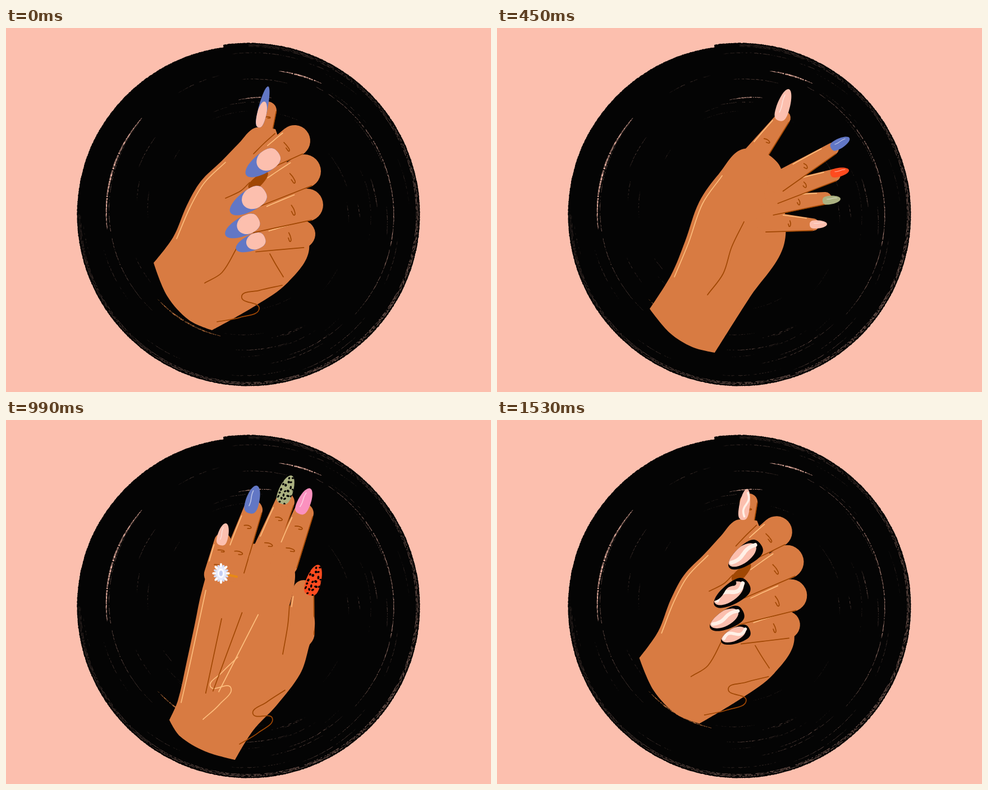
These frames come from a looping animation (864x648 px, 1.62 s). An HTML page with a canvas:

```html
<!DOCTYPE html>
<html lang="en">
<head>
<meta charset="utf-8">
<title>Nail art hand</title>
<style>
  html, body { margin: 0; width: 100%; height: 100%; overflow: hidden; background: #fcbfae; }
  canvas { display: block; width: 864px; height: 648px; }
</style>
</head>
<body>
<canvas id="stage" width="864" height="648"></canvas>
<script>
const W = 864, H = 648, STEP = 90, TURN = 9, TAU = Math.PI * 2;
const ROSE = '#fcbfae', INK = '#040404', SKIN = '#d87b42', LINE = '#a04703', LIGHT = '#fdbd7c';
const BLUE = '#6277c5', OLIVE = '#abb181', CREAM = '#fff0e6', ORANGE = '#ee7329', RED = '#ff4b1f', PINK = '#fb91bf';

const ctx = document.getElementById('stage').getContext('2d');
const lerp = (a, b, t) => a + (b - a) * t;

function seeded(seed) {
  return () => (seed = (seed * 16807) % 2147483647) / 2147483647;
}

const parse = text => text.split(' ').map(s => {
  const [x, y] = s.split(',').map(parseFloat);
  return { x, y, corner: s.endsWith('*') };
});

// Smooth curve through points; corner points stay sharp.
function curve(p, closed) {
  const n = p.length, path = new Path2D();
  const at = i => closed ? p[(i + n) % n] : p[Math.max(0, Math.min(n - 1, i))];
  const slope = i => {
    const a = at(i - 1), b = at(i + 1), d = Math.hypot(b.x - a.x, b.y - a.y) || 1;
    return at(i).corner ? [0, 0] : [(b.x - a.x) / d, (b.y - a.y) / d];
  };
  path.moveTo(p[0].x, p[0].y);
  for (let i = 0; i < (closed ? n : n - 1); i++) {
    const a = at(i), b = at(i + 1), k = Math.hypot(b.x - a.x, b.y - a.y) / 3;
    const [ax, ay] = slope(i), [bx, by] = slope(i + 1);
    path.bezierCurveTo(a.x + ax * k, a.y + ay * k, b.x - bx * k, b.y - by * k, b.x, b.y);
  }
  return path;
}

function stroke(color, points, width = 1.7) {
  ctx.strokeStyle = color;
  ctx.lineWidth = width;
  ctx.stroke(curve(points));
}

function blob(color, x, y, rx, ry, turn = 0) {
  ctx.fillStyle = color;
  ctx.beginPath();
  ctx.ellipse(x, y, rx, ry, turn, 0, TAU);
  ctx.fill();
}

function wave(color, x0, x1, y, width, swing = .35) {
  const points = [];
  for (let u = 0; u <= 1; u += .125) points.push({ x: lerp(x0, x1, u), y: y + swing * Math.sin(u * TAU) });
  stroke(color, points, width);
}

function spots(size, x0, x1, y0, y1) {
  const rnd = seeded(71), gap = size * 2.7;
  for (let x = x0; x < x1; x += gap) for (let y = y0; y < y1; y += gap) {
    blob(INK, x + rnd() * gap * .6, y + rnd() * gap * .6, size * (.6 + rnd() * .5), size * (.5 + rnd() * .3), rnd() * 3);
  }
}

// Nail paints work in nail space: x runs from root 0 to tip L, y from -1 to 1.
const paints = {
  plain: color => L => {
    blob(color, L / 2, 0, L, 2);
    wave('rgba(255,255,255,.6)', L * .25, L * .8, -.3, .12, .05);
  },
  leopard: color => L => {
    blob(color, L / 2, 0, L, 2);
    spots(.22, 0, L, -1, 1);
  },
  french: L => {
    blob(BLUE, L / 2, 0, L, 2);
    blob(ROSE, L * .3, 0, L * .33, 1.02);
  },
  swirl: (L, i) => {
    blob(i < 4 ? INK : ROSE, L / 2, 0, L, 2);
    blob(ROSE, L * .54, .22, L * .42, .8);
    wave(CREAM, L * .12, L * .88, .25, .38, i % 2 ? .15 : -.35);
    if (i === 2) wave(INK, L * .3, L, .75, .5, .2);
  },
  marble: L => {
    blob(CREAM, L / 2, 0, L, 2);
    blob(ROSE, L * .2, 0, L * .35, 1.1);
    [ORANGE, BLUE, RED, BLUE].forEach((c, k) => wave(c, L * .5, L, k * .5 - .75, k % 2 ? .17 : .26, .3));
  },
  abstract: (L, i) => {
    const side = i === 3 ? -1 : 1;
    blob(ROSE, L / 2, 0, L, 2);
    blob(OLIVE, L * (i === 1 ? .08 : .85), side * .45, L * .24, .65);
    blob(BLUE, L * (i === 1 ? .5 : .25), side * .5, L * .25, .5);
    wave(CREAM, L * .4, L * .9, side * .1, .2);
    spots(.085, L * .12, L * .55, side > 0 ? -.8 : .1, side > 0 ? -.1 : .8);
  }
};

function almond(x0, y0, x1, y1, half, paint) {
  const L = Math.hypot(x1 - x0, y1 - y0) / half;
  ctx.save();
  ctx.translate(x0, y0);
  ctx.rotate(Math.atan2(y1 - y0, x1 - x0));
  ctx.scale(half, half);
  ctx.beginPath();
  ctx.moveTo(0, 0);
  for (const s of [-1, 1]) {
    const [a, b] = s < 0 ? [0, L] : [L, 0];
    if (s < 0) {
      ctx.bezierCurveTo(a, -.75, L * .1, -1, L * .35, -1);
      ctx.bezierCurveTo(L * .7, -1, b, -.55, b, 0);
    } else {
      ctx.bezierCurveTo(a, .55, L * .7, 1, L * .35, 1);
      ctx.bezierCurveTo(L * .1, 1, b, .75, b, 0);
    }
  }
  ctx.clip();
  paint(L);
  ctx.restore();
}

// A tapered finger with a dark edge, a highlight on the other side, and knuckle creases.
function finger([x0, y0, x1, y1, r1], taper, creases) {
  const r0 = r1 * taper, a = Math.atan2(y1 - y0, x1 - x0), d = Math.hypot(x1 - x0, y1 - y0);
  const b = Math.acos((r0 - r1) / d);
  const at = (t, side) => {
    const r = lerp(r0, r1, t) * side;
    return { x: lerp(x0, x1, t) - Math.sin(a) * r, y: lerp(y0, y1, t) + Math.cos(a) * r };
  };
  ctx.fillStyle = SKIN;
  ctx.beginPath();
  ctx.arc(x1, y1, r1, a - b, a + b);
  ctx.arc(x0, y0, r0, a + b, a - b + TAU);
  ctx.fill();
  stroke(LINE, [at(0, .97), at(.5, .97), at(1, .97)]);
  stroke(LIGHT, [at(.35, -.85), at(.6, -.87), at(.85, -.87)]);
  for (const t of creases) stroke(LINE, [at(t, -.3), at(t + .02, .05), at(t, .4), at(t - .03, .1)]);
}

function squiggle(color, [x0, y0, x1, y1]) {
  const dx = x1 - x0, dy = y1 - y0;
  const along = [0, .3, .55, .42, .7, 1], aside = [0, .09, .13, -.12, -.1, 0];
  stroke(color, along.map((t, i) => ({ x: x0 + dx * t - dy * aside[i], y: y0 + dy * t + dx * aside[i] })));
}

function jewel([x, y, rx, bandX, bandY]) {
  const ry = rx * 1.25;
  stroke('#e88913', [{ x, y }, { x: bandX, y: bandY }], 4);
  for (let i = 0; i < 16; i++) {
    const a = i * TAU / 16, r = i % 2 ? .62 : .74;
    blob(i % 2 ? '#d5dbf6' : '#fbfbff', x + rx * r * Math.cos(a), y + ry * r * Math.sin(a), rx * .3, rx * .15, a);
  }
  ['#e6eafb', '#fbfbff', '#c3cdf3'].forEach((c, i) => blob(c, x, y, rx * (.6 - i * .2), ry * (.62 - i * .18)));
}

// Fingers run from little finger to thumb: base, end, end radius, nail root, nail tip.
const fist = {
  palm: '263,418* 298,372 322,316 347,273 385,236 415,205 443,178 480,180* 520,300 540,394 502,453 445,494 367,538* 326,520 287,477',
  fingers: [[442, 383, 526, 367, 25, 461, 373, 410, 394], [435, 347, 536, 315, 29, 450, 340, 391, 369], [445, 300, 531, 255, 30, 461, 290, 400, 329],
    [455, 238, 514, 201, 28, 485, 222, 428, 262], [462, 195, 466, 147, 16, 450, 177, 467, 104]],
  taper: .65, creases: [.75], nailWidth: .26, thumbNail: .11,
  lines: ['479,188 460,205 441,224', '412,390 385,435 354,454', '470,402 480,420 494,443', '434,275 418,290 391,303'],
  squiggles: [[492, 458, 376, 523]],
  gaps: [[434, 287, 466, 257, 9]],
  paints: Array(5).fill(paints.french)
};

const palmSide = {
  palm: '260,458* 298,419 325,375 345,330 362,290 384,260 440,217 462,206 490,196 505,203 522,300 515,360 482,402 440,472 412,512 366,549* 333,537 297,506',
  fingers: [[480, 385, 506, 370, 22, 496, 384, 457, 399], [488, 340, 509, 331, 21, 504, 350, 464, 377], [488, 302, 521, 276, 23, 522, 295, 502, 330],
    [495, 262, 511, 224, 18, 519, 239, 518, 286], [450, 250, 488, 200, 17, 482, 208, 502, 156]],
  taper: .75, creases: [], nailWidth: .25, thumbNail: .24,
  lines: ['505,200 461,285 449,335 440,390 398,475', '470,412 440,467 412,500 368,536', '429,427 431,440 427,450', '453,227 463,229 471,239'],
  squiggles: [[440, 322, 394, 441]],
  shine: [[313, 432, 324, 494]],
  gaps: [[470, 264, 495, 233, 8], [459, 302, 502, 284, 7], [464, 334, 498, 329, 4]],
  paints: Array(5).fill(paints.marble)
};

const sideways = {
  palm: '272,500* 310,440 335,380 360,310 395,260 440,215 500,240 510,300 510,390 450,480 388,578* 348,568 308,543',
  fingers: [[480, 345, 563, 350, 11, 557, 350, 588, 349], [490, 315, 585, 303, 11, 580, 308, 612, 304], [495, 295, 601, 262, 11, 594, 260, 627, 253],
    [500, 275, 598, 215, 11, 595, 214, 628, 196], [450, 240, 510, 160, 13, 502, 165, 520, 109]],
  taper: 1.7, creases: [.5], nailWidth: .24, thumbNail: .2,
  lines: ['440,345 418,390 403,437 375,475'],
  paints: [ROSE, OLIVE, RED, BLUE, ROSE].map(paints.plain)
};

const back = {
  palm: '291,534* 306,500 322,430 336,365 350,300 372,240 400,225 450,220* 500,215 515,275 505,330* 520,340 549,352 538,410 524,452 482,508 440,553 408,605* 355,590 310,563',
  fingers: [[373, 275, 386, 216, 15, 382, 223, 392, 184], [403, 265, 440, 160, 17, 433, 166, 447, 117], [455, 250, 497, 146, 17, 490, 149, 509, 99],
    [496, 255, 530, 166, 18, 522, 167, 542, 122], [524, 380, 530, 304, 19, 540, 312, 557, 258]],
  taper: 1.35, creases: [.28, .72], nailWidth: .24, thumbNail: .24,
  lines: ['505,330 502,365 493,417'],
  squiggles: [[497, 481, 416, 577]],
  shine: [[413, 422, 351, 533]],
  wrist: [340, 560],
  jewel: [383, 273, 15, 411, 279],
  paints: [paints.plain(ROSE), paints.plain(BLUE), paints.leopard(OLIVE), paints.plain(PINK), paints.leopard(RED)]
};

const openBack = {
  ...back,
  palm: '287,533* 297,490 300,420 303,360 310,325 345,318 400,270 440,308* 470,290 493,330 492,381* 520,370 549,362 535,422 522,460 488,522 443,566 410,606* 358,593 313,568',
  fingers: [[323, 325, 314, 219, 15, 309, 234, 307, 185], [375, 290, 385, 149, 17, 381, 167, 384, 110], [417, 300, 448, 112, 19, 445, 130, 448, 62],
    [467, 310, 497, 138, 18, 493, 158, 491, 94], [518, 390, 531, 309, 18, 536, 329, 563, 267]],
  lines: ['493,382 492,420 487,447'],
  squiggles: [[482, 512, 419, 576]],
  shine: [[337, 391, 316, 464]],
  wrist: [330, 560],
  jewel: [357, 297, 19, 389, 297],
  paints: Array(5).fill(paints.abstract)
};

function mix(a, b, t) {
  if (typeof a === 'number') return lerp(a, b, t);
  if (typeof a === 'function') return a;
  if (Array.isArray(a)) return a.map((v, i) => mix(v, b[i], t));
  if (typeof a === 'object') return Object.fromEntries(Object.keys(a).map(k => [k, mix(a[k], b[k], t)]));
  const other = b.match(/[\d.]+/g);
  return a.replace(/[\d.]+/g, v => lerp(+v, +other.shift(), t).toFixed(1));
}

const moved = (hand, dx, dy, turn, scale = 1) => ({ ...hand, move: { dx, dy, turn, scale } });

const shortThumb = fist.fingers.map((f, i) => i < 4 ? f : [...f.slice(0, 5), 454, 178, 464, 123]);
const swirlFist = { ...fist, fingers: shortThumb, thumbNail: .17, paints: Array(5).fill(paints.swirl) };

const poses = [fist, moved(swirlFist, -7, 4, -.03), moved(palmSide, -3, -8, -.04), palmSide, moved(sideways, -6, -14, -.04, .94),
  sideways, mix(back, openBack, -.22), back, mix(back, openBack, .5), openBack];

function drawHand(hand) {
  const { palm, fingers, taper, creases, lines, squiggles = [], shine = [], gaps = [], wrist, move } = hand;
  const outline = parse(palm);
  ctx.save();
  ctx.lineCap = ctx.lineJoin = 'round';
  if (move) {
    ctx.translate(315 + move.dx, 503 + move.dy);
    ctx.rotate(move.turn);
    ctx.scale(move.scale, move.scale);
    ctx.translate(-315, -503);
  }
  finger(fingers[4], taper, creases.slice(0, 1));
  ctx.fillStyle = SKIN;
  ctx.fill(curve(outline, true));
  fingers.slice(0, 4).forEach(f => finger(f, taper, creases));
  gaps.forEach(g => almond(...g, L => blob(LINE, L / 2, 0, L, 2)));
  lines.forEach(s => stroke(LINE, parse(s)));
  squiggles.forEach(s => squiggle(LINE, s));
  shine.forEach(s => squiggle(LIGHT, s));
  stroke(LIGHT, outline.slice(1, 5).map(p => ({ x: p.x + 6, y: p.y + 3 })));
  if (wrist) [LINE, LINE, LIGHT].forEach((color, i) => {
    const [x, y] = fingers[i + 1];
    stroke(color, [.3, .75].map(t => ({ x: lerp(x, wrist[0], t), y: lerp(y, wrist[1], t) })));
  });
  fingers.forEach((f, i) => {
    const [x0, y0, x1, y1] = f.slice(5);
    const half = Math.hypot(x1 - x0, y1 - y0) * (i < 4 ? hand.nailWidth : hand.thumbNail);
    almond(x0, y0, x1, y1, half, L => hand.paints[i](L, i));
  });
  if (hand.jewel) jewel(hand.jewel);
  ctx.restore();
}

// Dry-brush disc, painted once.
function paintDisc() {
  const sheet = document.createElement('canvas'), c = sheet.getContext('2d'), rnd = seeded(19);
  const CX = 432, CY = 332, deg = Math.PI / 180;
  sheet.width = W;
  sheet.height = H;
  c.fillStyle = ROSE;
  c.fillRect(0, 0, W, H);
  c.fillStyle = INK;
  c.beginPath();
  for (let i = 0; i <= 1400; i++) {
    const u = i / 1400, a = (-98.5 + 360 * u) * deg;
    const r = 305.5 - 4.5 * Math.max(0, (u - .84) / .16) + (rnd() - .5) * .8;
    c.lineTo(CX + r * Math.cos(a), CY + r * Math.sin(a));
  }
  c.fill();
  const scratch = (r0, r1, from, to, width, alpha, color = ROSE) => {
    c.strokeStyle = color;
    for (let a = from; a < to; a += .5) {
      const u = (a - from) / (to - from);
      c.globalAlpha = alpha * (.3 + .7 * rnd());
      c.lineWidth = width * (.3 + .7 * Math.sin(Math.PI * u));
      c.beginPath();
      c.arc(CX, CY, lerp(r0, r1, u) + (rnd() - .5) * .5, a * deg, (a + .55) * deg);
      if (rnd() < .45 + alpha * .5) c.stroke();
    }
  };
  scratch(253, 256, 174, 222, 3, 1);
  scratch(261, 267, 282, 299, 2.4, 1);
  scratch(257, 260, 298, 403, 1.4, .7);
  scratch(205, 212, 265, 281, 1.6, .9);
  scratch(222, 221, 103, 137, 2.4, .9, '#cf7d42');
  scratch(242, 254, 135, 220, 1, .5);
  for (let r = 299; r < 304; r += 1.7) scratch(r, r, -90, 180, 1.1, .55);
  for (let i = 0; i < 48; i++) {
    const r = 165 + rnd() * 130, a = rnd() * 360;
    scratch(r, r + 3, a, a + 5 + rnd() * 22, 1, .15 + rnd() * .3);
  }
  return sheet;
}

const disc = paintDisc();
let start, shown = -1;

function tick(now) {
  start ??= now;
  const beat = Math.floor((now - start) / STEP) % (TURN * 2);
  const index = beat <= TURN ? beat : TURN * 2 - beat;
  if (index !== shown) {
    shown = index;
    ctx.drawImage(disc, 0, 0);
    drawHand(poses[index]);
  }
  requestAnimationFrame(tick);
}
requestAnimationFrame(tick);
</script>
</body>
</html>
```
